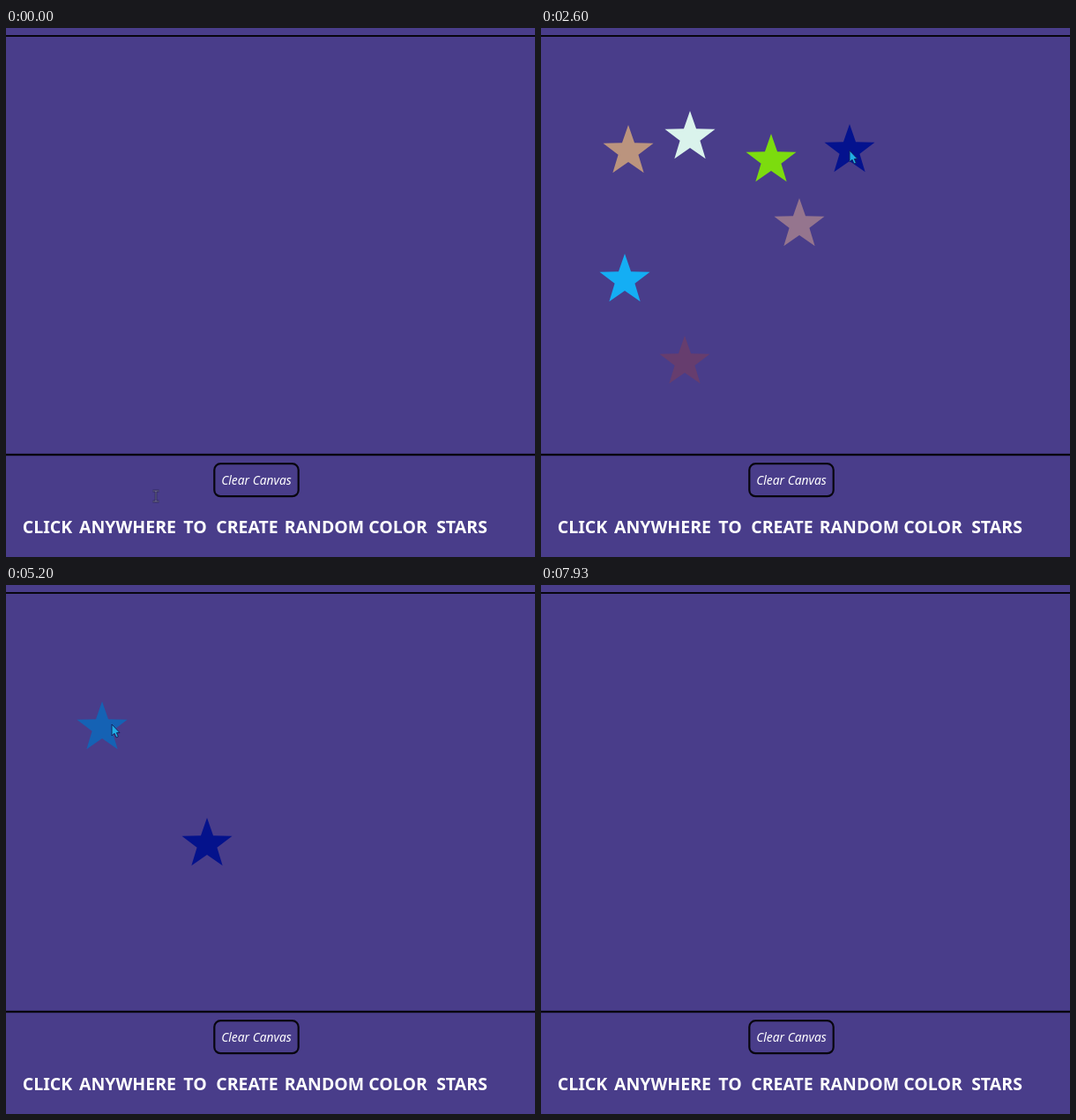
Animation of 600x600 px, one loop 8060 ms. Source, as an HTML page with a canvas:

```html
<!DOCTYPE html>
<html lang="en">
<head>
<meta charset="utf-8">
<title>Color stars</title>
<style>
  html, body { margin: 0; width: 100%; height: 100%; overflow: hidden; background: #493d8a; }
  canvas { display: block; }
</style>
</head>
<body>
<canvas id="stage" width="600" height="600"></canvas>
<script>
const ctx = document.getElementById('stage').getContext('2d');
const LOOP = 8060, STEP = 130;
const CLEARS = [4420, 6500];

// Each click: time, x, y, star color
const clicks = [
  [390, 163, 379, '#663d6e'],
  [780, 95, 286, '#14aef4'],
  [1170, 99, 140, '#bb947e'],
  [1560, 169, 124, '#daf3ec'],
  [2080, 261, 150, '#7cdc0e'],
  [2340, 293, 223, '#95758e'],
  [2600, 350, 139, '#04128e'],
  [2860, 402, 158, '#1cf5e0'],
  [3250, 408, 284, '#1c8454'],
  [3510, 317, 344, '#14bca6'],
  [3770, 212, 409, '#95758e'],
  [4810, 228, 294, '#04128c'],
  [5070, 109, 162, '#1562b4'],
  [5330, 172, 127, '#9631ac'],
  [5590, 329, 174, '#64c746'],
  [5850, 305, 272, '#f47716'],
];

// Pointer stops that do not create a star
const rests = [
  [0, 170, 531], [1690, 169, 124], [3380, 406, 291], [4160, 270, 493],
  [4290, 278, 510], [4420, 278, 510], [5200, 120, 158], [5980, 289, 310],
  [6370, 281, 511], [6500, 281, 511], [7020, 276, 592],
];
const path = [...clicks, ...rests].sort((a, b) => a[0] - b[0]);

// Words of the heading with their center positions
const words = [['CLICK', 47], ['ANYWHERE', 138], ['TO', 214.5], ['CREATE', 273.5],
  ['RANDOM', 361], ['COLOR', 444.5], ['STARS', 517]];

function pointerAt(t) {
  const i = path.findIndex(p => p[0] > t);
  if (i < 0) return path[path.length - 1].slice(1, 3);
  const [t0, x0, y0] = path[i - 1], [t1, x1, y1] = path[i];
  const u = (t - t0) / (t1 - t0), k = u * u * (3 - 2 * u);
  return [x0 + (x1 - x0) * k, y0 + (y1 - y0) * k];
}

function drawStar(x, y, color) {
  ctx.beginPath();
  for (let i = 0; i < 10; i++) {
    const r = i % 2 ? 12 : 30, a = i * Math.PI / 5;
    ctx.lineTo(x + r * Math.sin(a), y - r * Math.cos(a));
  }
  ctx.fillStyle = color;
  ctx.fill();
}

function drawArrow(x, y) {
  const shape = new Path2D('M0 0V13L3 10.3L5 15L7.4 14L5.4 9.6H9Z');
  ctx.save();
  ctx.translate(x, y);
  ctx.fillStyle = '#20aee6';
  ctx.fill(shape);
  ctx.strokeStyle = '#15245f';
  ctx.stroke(shape);
  ctx.restore();
}

function drawTextCursor(x, y) {
  const shape = new Path2D('M-3.5 -6H3.5M0 -6V6M-3.5 6H3.5');
  ctx.save();
  ctx.translate(Math.round(x), Math.round(y));
  for (const [width, color] of [[2.4, '#1f1b40'], [0.8, '#8f8ab5']]) {
    ctx.lineWidth = width;
    ctx.strokeStyle = color;
    ctx.stroke(shape);
  }
  ctx.restore();
}

function drawPage() {
  ctx.fillStyle = '#493d8a';
  ctx.fillRect(0, 0, 600, 600);
  ctx.fillStyle = '#08060f';
  ctx.fillRect(0, 8, 600, 2);
  ctx.fillRect(0, 482.8, 600, 2.4);

  ctx.strokeStyle = '#08060f';
  ctx.lineWidth = 2.2;
  ctx.beginPath();
  ctx.roundRect(236.3, 494.2, 95.4, 37, 7);
  ctx.stroke();
  ctx.lineWidth = 1;

  ctx.fillStyle = '#fff';
  ctx.textAlign = 'center';
  ctx.font = 'italic 500 13.8px "Noto Sans", sans-serif';
  ctx.fillText('Clear Canvas', 284, 518);
  ctx.font = 'bold 19.5px "Noto Sans", sans-serif';
  for (const [word, x] of words) ctx.fillText(word, x, 573);
}

function draw(t) {
  drawPage();
  const cleared = Math.max(0, ...CLEARS.filter(c => c <= t));
  for (const [time, x, y, color] of clicks)
    if (time >= cleared && time <= t) drawStar(x, y, color);

  if (t > 7000) return;
  const [x, y] = pointerAt(t);
  const overText = y > 540 || (y > 500 && x < 236);
  (overText ? drawTextCursor : drawArrow)(x, y);
}

const start = performance.now();
function tick() {
  const t = (performance.now() - start) % LOOP;
  draw(Math.floor(t / STEP) * STEP);
  requestAnimationFrame(tick);
}
tick();
</script>
</body>
</html>
```
